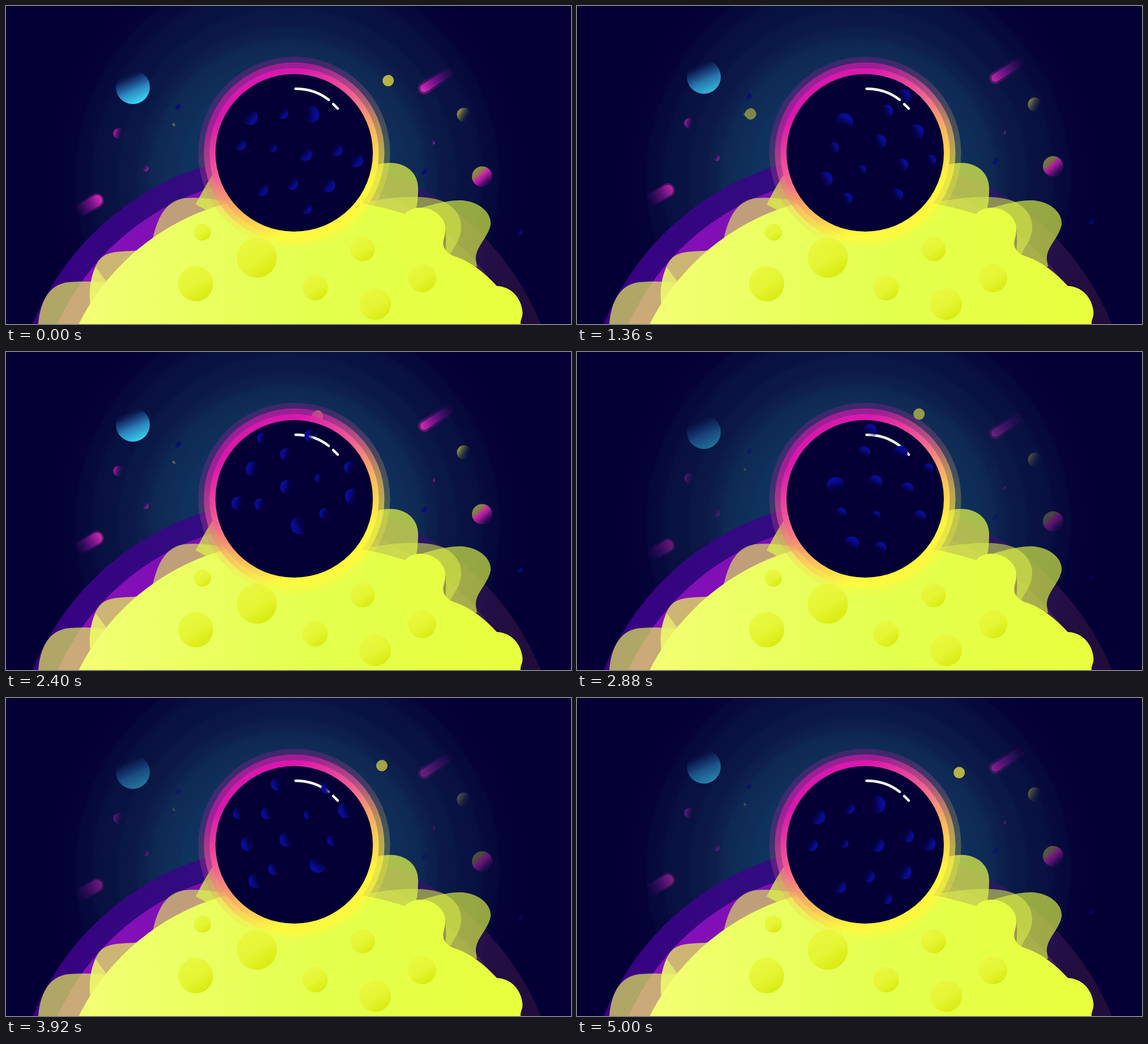
Recreate the animation shown at these times as an HTML page. Size 998 px wide and 561 px high, loop 5.04 s.

```html
<!DOCTYPE html>
<html lang="en">
<head>
<meta charset="utf-8">
<title>Dark moon</title>
<style>
  html, body { margin: 0; width: 100%; height: 100%; overflow: hidden; background: #040035; }
  svg { display: block; width: 100vw; height: 100vh; }
</style>
</head>
<body>
<svg viewBox="0 0 998 561">
  <defs>
    <radialGradient id="glow" gradientUnits="userSpaceOnUse" cx="497" cy="303" r="430">
      <stop offset="0" stop-color="#112c5a"/><stop offset=".43" stop-color="#0c1f50"/>
      <stop offset=".64" stop-color="#08103f"/><stop offset=".88" stop-color="#050338"/>
      <stop offset="1" stop-color="#040035"/>
    </radialGradient>
    <linearGradient id="outer" gradientUnits="userSpaceOnUse" x1="40" x2="950">
      <stop offset="0" stop-color="#380083"/><stop offset=".35" stop-color="#340b82" stop-opacity=".95"/>
      <stop offset=".75" stop-color="#34126e" stop-opacity=".7"/><stop offset="1" stop-color="#4a2040" stop-opacity=".4"/>
    </linearGradient>
    <linearGradient id="inner" gradientUnits="userSpaceOnUse" x1="80" x2="920">
      <stop offset="0" stop-color="#8d10bd"/><stop offset=".35" stop-color="#780fb0"/>
      <stop offset=".75" stop-color="#5a2878" stop-opacity=".7"/><stop offset="1" stop-color="#5a3a45" stop-opacity=".35"/>
    </linearGradient>
    <linearGradient id="land" gradientUnits="userSpaceOnUse" x1="130" x2="915">
      <stop offset="0" stop-color="#f3ff74"/><stop offset=".3" stop-color="#e9ff5e"/>
      <stop offset=".55" stop-color="#e3ff4d"/><stop offset="1" stop-color="#e8ff3c"/>
    </linearGradient>
    <linearGradient id="halo" gradientUnits="userSpaceOnUse" x1="447" y1="156" x2="566" y2="354">
      <stop offset="0" stop-color="#d818ac"/><stop offset=".35" stop-color="#f25b94"/>
      <stop offset=".65" stop-color="#fbb062"/><stop offset="1" stop-color="#fff83e"/>
    </linearGradient>
    <linearGradient id="dent" x1=".2" y1=".1" x2=".75" y2=".95">
      <stop offset="0" stop-color="#e8f83f"/><stop offset=".55" stop-color="#e4f533"/><stop offset="1" stop-color="#d8ea0e"/>
    </linearGradient>
    <linearGradient id="crater" x1=".9" y1=".8" x2=".25" y2=".25">
      <stop offset="0" stop-color="#0a0ca4"/><stop offset=".35" stop-color="#090a86"/>
      <stop offset="1" stop-color="#050040" stop-opacity="0"/>
    </linearGradient>
    <linearGradient id="cyan" x1=".7" y1="1" x2=".3" y2=".12">
      <stop offset="0" stop-color="#3fe0fa"/><stop offset=".45" stop-color="#2c88c0"/>
      <stop offset=".75" stop-color="#1b4180" stop-opacity=".8"/><stop offset="1" stop-color="#0a1848" stop-opacity="0"/>
    </linearGradient>
    <linearGradient id="pink" x1="0" y1=".4" x2=".85" y2=".6">
      <stop offset="0" stop-color="#c222ac"/><stop offset="1" stop-color="#500a70" stop-opacity="0"/>
    </linearGradient>
    <linearGradient id="olive" x1="0" y1=".3" x2=".85" y2=".75">
      <stop offset="0" stop-color="#b0ae4a"/><stop offset="1" stop-color="#202840" stop-opacity="0"/>
    </linearGradient>
    <linearGradient id="striped" x1=".15" y1=".1" x2=".85" y2=".9">
      <stop offset="0" stop-color="#8f9a45"/><stop offset=".3" stop-color="#937650"/>
      <stop offset=".42" stop-color="#d426b0"/><stop offset=".58" stop-color="#a51c9c"/>
      <stop offset="1" stop-color="#22084c" stop-opacity=".5"/>
    </linearGradient>
    <linearGradient id="tail">
      <stop offset="0" stop-color="#e62cb8"/><stop offset=".4" stop-color="#8c149a" stop-opacity=".75"/>
      <stop offset="1" stop-color="#400a60" stop-opacity="0"/>
    </linearGradient>
  </defs>

  <rect width="998" height="561" fill="url(#glow)"/>
  <g id="rings" fill="#2a6888" fill-opacity=".035"></g>

  <g id="floaters">
    <circle cx="224" cy="143" r="30" fill="url(#cyan)"/>
    <circle cx="199" cy="225" r="9.5" fill="url(#pink)"/>
    <circle cx="246" cy="286" r="6" fill="url(#pink)" transform="rotate(200 246 286)"/>
    <circle cx="754" cy="241" r="3.5" fill="url(#pink)" transform="rotate(180 754 241)"/>
    <circle cx="298" cy="208.500" r="3.500" fill="url(#olive)" transform="rotate(-60 298 208.500)"/>
    <circle cx="809" cy="192" r="12.500" fill="url(#olive)"/>
    <circle cx="841" cy="301" r="18" fill="url(#striped)"/>
    <g fill="url(#crater)">
      <circle cx="303" cy="177" r="5.500"/><circle cx="738" cy="292" r="5.500"/><circle cx="907" cy="398" r="5.500"/>
    </g>
    <g fill="url(#tail)">
      <g transform="translate(160 343.500) rotate(150)">
        <rect x="-13" y="-13" width="60" height="26" rx="13" opacity=".38"/>
        <rect x="-10" y="-10" width="52" height="20" rx="10"/>
      </g>
      <g transform="translate(739 145) rotate(-33)">
        <rect x="-11" y="-11" width="78" height="22" rx="11" opacity=".38"/>
        <rect x="-7" y="-7" width="70" height="14" rx="7"/>
      </g>
    </g>
  </g>

  <circle cx="496" cy="745" r="485" fill="url(#outer)"/>
  <circle cx="496" cy="745" r="445" fill="url(#inner)"/>

  <g fill="#e4ec5c">
    <path opacity=".7" d="M57 561C61 515 80 489 113 487Q150 484 185 490L300 561Z"/>
    <path opacity=".75" d="M158 561C144 525 145 490 158 460C168 436 184 433 225 432L300 420V561Z"/>
    <path opacity=".65" d="M259 411C268 372 282 344 315 339Q350 336 390 345V420Z"/>
    <path opacity=".75" fill="#ddf04a" d="M335 350Q350 320 366 296L460 250L640 285Q665 275 685 277C712 280 728 298 728 322Q728 345 724 360L500 440Z"/>
    <path opacity=".55" fill="#ddf04a" d="M640 345Q735 328 775 346C803 361 811 388 798 415Q782 440 772 466L680 460Z"/>
    <path opacity=".68" fill="#d9f044" d="M730 357C770 345 790 342 808 343C840 347 858 367 856 386C851 410 828 426 830 448L832 460L771 464Q780 425 776 390Z"/>
  </g>
  <g fill="url(#land)">
    <circle cx="496" cy="745" r="411"/>
    <path d="M420 344Q560 322 705 367C716 353 744 351 763 367C780 383 777 398 773 412C769 428 780 438 797 443Q832 456 867 494C893 495 909 515 912 537C914 548 908 553 909 561H300Z"/>
    <path opacity=".6" d="M158 561C144 525 145 490 158 460L180 490L250 561Z"/>
  </g>
  <g id="dents" fill="url(#dent)"></g>

  <g transform="translate(476 180.500) rotate(-13.800)">
    <path id="orbit" fill="none" d="M205 0A205 53 0 0 1-205 0A205 53 0 0 1 205 0"/>
    <circle id="back" r="10" fill="#fff143"/>
  </g>
  <g fill="url(#halo)">
    <circle cx="509" cy="259" r="169.500" opacity=".24"/>
    <circle cx="509" cy="259" r="159.500" opacity=".62"/>
    <circle cx="509" cy="259" r="149.500"/>
  </g>
  <circle cx="509" cy="259" r="139" fill="#040035"/>
  <path d="M511.500 146Q545 146 570 165.500M578 173L586 181" fill="none" stroke="#fff" stroke-width="4.500" stroke-linecap="round"/>
  <g id="craters" fill="url(#crater)"></g>
  <g transform="translate(476 180.500) rotate(-13.800)">
    <circle id="front" r="10" fill="#fff143"/>
  </g>
</svg>
<script>
const LOOP = 5040, SPIN = 1680, BLINK = 1150;
const $ = id => document.getElementById(id);

function addCircles(id, list) {
  for (const [cx, cy, r, turn = 0] of list) {
    const c = document.createElementNS('http://www.w3.org/2000/svg', 'circle');
    const attrs = { cx, cy, r, transform: `rotate(${turn} ${cx} ${cy})` };
    for (const k in attrs) c.setAttribute(k, attrs[k]);
    $(id).append(c);
  }
}

addCircles('rings', [375, 345, 299, 266, 248, 243, 190].map(r => [497, 303, r]));
addCircles('dents', [[347, 399, 15], [443, 444, 35.5], [335, 490, 31], [546, 497, 22.5],
  [630, 429, 21.5], [652, 526, 28], [735, 480, 25]]);
addCircles('craters', [[431, 196.5, 13.5], [488.5, 190, 9.5], [537.5, 191, 15.5, -38],
  [413.5, 244.5, 10.5], [471, 250, 7.5], [528, 261, 12.5], [583.5, 253.5, 11], [618.5, 271.5, 12.5],
  [505, 313.5, 11], [452, 324.5, 11], [568.5, 315.5, 13], [531, 357.5, 9.5]]);

// Interpolates [time, value] keys with the given easing.
function track(keys, t, ease) {
  let i = 1;
  while (i < keys.length - 1 && t > keys[i][0]) i++;
  const [t0, v0] = keys[i - 1], [t1, v1] = keys[i];
  return v0 + (v1 - v0) * ease(Math.min(1, (t - t0) / (t1 - t0)));
}
const linear = x => x;
const sine = x => (1 - Math.cos(Math.PI * x)) / 2;

// cubic-bezier(.33, 0, 0, 1)
function glide(x) {
  let lo = 0, hi = 1;
  for (let i = 0; i < 24; i++) {
    const s = (lo + hi) / 2;
    if (.99 * s * (1 - s) ** 2 + s ** 3 < x) lo = s; else hi = s;
  }
  return lo * lo * (3 - 2 * lo);
}

const lift = [[0, 0], [560, 0], [1660, -22], [1960, -22], [3100, 0], [3340, 0], [4400, -22], [LOOP, -22]];
const ballAlpha = [[0, .7], [400, 1], [960, 1], [1360, .46], [LOOP, .7]];
const orbit = $('orbit'), orbitLength = orbit.getTotalLength();

function draw(now) {
  const t = now % LOOP;

  $('craters').setAttribute('transform', `rotate(${t / SPIN * 360} 515 246)`);

  $('floaters').setAttribute('transform', `translate(0 ${track(lift, t, sine)})`);
  $('floaters').setAttribute('opacity', .73 + .27 * Math.cos(2 * Math.PI * t / BLINK));

  const p = glide(t / LOOP), pos = orbit.getPointAtLength(p * orbitLength);
  for (const id of ['front', 'back']) {
    const ball = $(id);
    ball.setAttribute('cx', pos.x);
    ball.setAttribute('cy', pos.y);
    ball.setAttribute('opacity', (id === 'front') === (p < .5) ? track(ballAlpha, t, linear) : 0);
  }
}

const start = performance.now();
function tick() {
  draw(performance.now() - start);
  requestAnimationFrame(tick);
}
tick();
</script>
</body>
</html>
```
